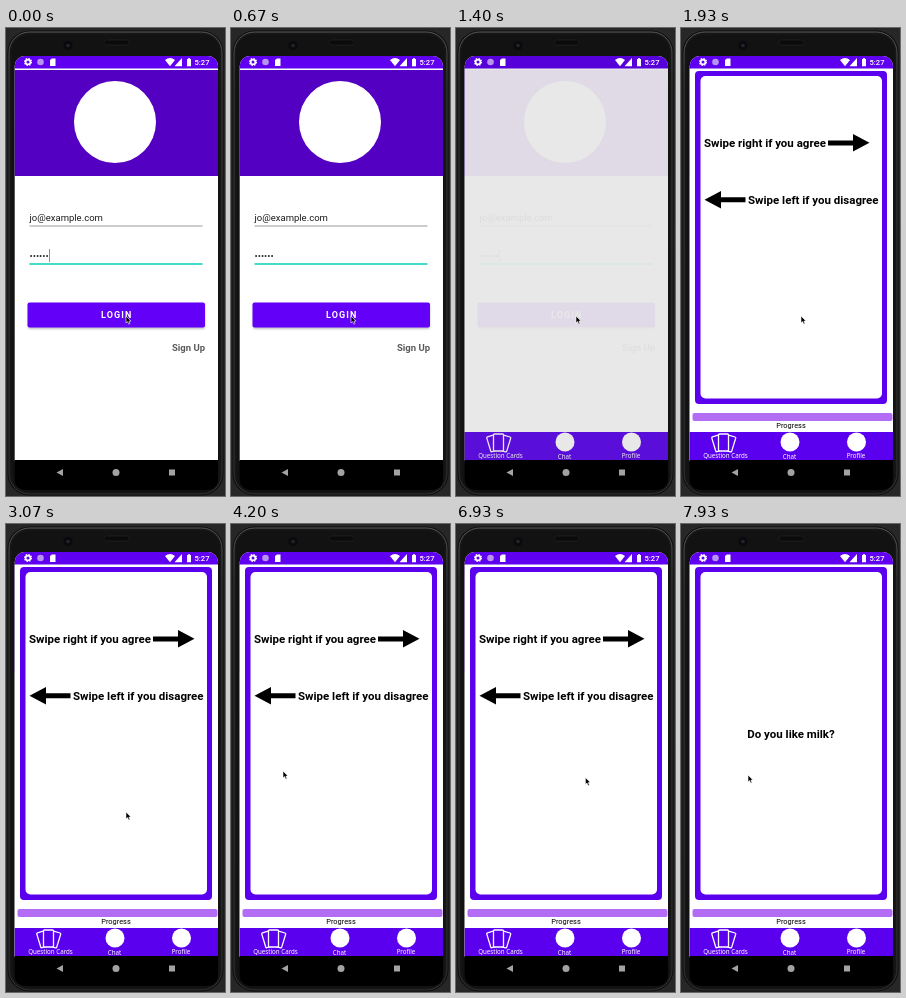
An HTML page for the animation above (8 s loop, 219 by 468 pixels).

```html
<!DOCTYPE html>
<html lang="en">
<head>
<meta charset="utf-8">
<title>Login and question cards</title>
<style>
  html, body { margin: 0; width: 100%; height: 100%; overflow: hidden; background: #272727; }
  svg { display: block; width: 100vw; height: 100vh; }
  text { font-family: Roboto, sans-serif; }
  .field { font-size: 9.5px; fill: #1c1c1c; }
  .card { font-size: 11.5px; font-weight: 700; }
  .tab { font: 6.2px "Noto Sans", sans-serif; fill: #fff; text-anchor: middle; }
</style>
</head>
<body>
<svg viewBox="0 0 219 468">
  <defs>
    <linearGradient id="rim" x2="0" y2="1">
      <stop offset="0" stop-color="#5c5c5c"/>
      <stop offset=".12" stop-color="#3c3c3c"/>
      <stop offset="1" stop-color="#343434"/>
    </linearGradient>
    <clipPath id="screenClip"><rect x="8.7" y="28" width="203.3" height="434" rx="10"/></clipPath>
    <clipPath id="buttonClip"><rect x="21.5" y="274.5" width="177.5" height="25" rx="2"/></clipPath>
    <filter id="blur" x="-10%" y="-50%" width="120%" height="200%"><feGaussianBlur stdDeviation="1.2"/></filter>
  </defs>

  <!-- phone body -->
  <rect x="1.5" y="2.5" width="216" height="465" rx="22" fill="#0c0c0c"/>
  <rect x="3" y="4" width="213" height="462" rx="20.5" fill="#161616" stroke="url(#rim)"/>
  <rect x="5.5" y="7" width="208" height="457" rx="17" fill="#121212"/>
  <circle cx="62" cy="17.5" r="4.5" fill="#0a0a0c"/>
  <circle cx="62" cy="17.5" r="1.8" fill="#24262e"/>
  <rect x="98" y="12" width="25" height="5" rx="2.5" fill="#0b0b0c" stroke="#262626" stroke-width=".6"/>

  <g clip-path="url(#screenClip)">
    <rect x="8" y="28" width="205" height="405" fill="#fff"/>

    <g id="login">
      <rect x="8" y="42" width="205" height="106" fill="#5400c2"/>
      <circle cx="109" cy="94" r="41" fill="#fff"/>
      <text class="field" x="23.5" y="193.3">jo@example.com</text>
      <path d="M23.5 198H196.5" stroke="#999"/>
      <text class="field" x="23.5" y="231">••••••</text>
      <path id="caret" d="M43.5 221V234" stroke="#03d0bd"/>
      <path d="M23.5 236H196.5" stroke="#03d0bd" stroke-width="1.3"/>
      <rect id="shadow" x="22" y="276" width="177" height="25" rx="2" filter="url(#blur)"/>
      <rect x="21.5" y="274.5" width="177.5" height="25" rx="2" fill="#6200f8"/>
      <circle id="ripple" cx="120" cy="289" fill="#fff" clip-path="url(#buttonClip)"/>
      <text x="95" y="290.3" font-size="9" font-weight="600" letter-spacing="1.1" fill="#fff">LOGIN</text>
      <text x="166" y="322.5" font-size="9.5" font-weight="700" fill="#5a5a5a">Sign Up</text>
    </g>

    <g id="home">
      <rect x="8" y="41" width="205" height="392" fill="#fff"/>
      <g id="content">
        <rect x="14" y="43" width="192" height="333" rx="4" fill="#5a00ee"/>
        <rect x="19.5" y="48" width="181.5" height="322.5" rx="5" fill="#fff"/>
        <g id="help" class="card">
          <text x="23" y="118.5">Swipe right if you agree</text>
          <path d="M147 112.5H172V106L188.5 114.8L172 123.5V117.5H147Z"/>
          <path d="M64.5 169.3H40V163L23.5 171.7L40 180.5V174.3H64.5Z"/>
          <text x="67" y="176">Swipe left if you disagree</text>
        </g>
        <text id="question" class="card" x="110" y="213.5" text-anchor="middle">Do you like milk?</text>
        <rect x="11.5" y="385" width="200" height="8" rx="2" fill="#b36df5"/>
        <text x="110" y="400" font-size="7.4" text-anchor="middle">Progress</text>
      </g>
      <rect x="8" y="404" width="205" height="29" fill="#5a00ee"/>
      <g fill="#5a00ee" stroke="#fff" stroke-width="1.3" stroke-linejoin="round">
        <rect x="32.5" y="407.5" width="9.5" height="15.5" rx="1" transform="rotate(-17 37 415)"/>
        <rect x="43.5" y="407.5" width="9.5" height="15.5" rx="1" transform="rotate(17 48 415)"/>
        <rect x="37.5" y="406" width="10" height="17" rx="1"/>
      </g>
      <circle cx="109" cy="414" r="9.5" fill="#fff"/>
      <circle cx="175.5" cy="414" r="9.5" fill="#fff"/>
      <text class="tab" x="44.5" y="430">Question Cards</text>
      <text class="tab" x="108.5" y="430.5">Chat</text>
      <text class="tab" x="175" y="430">Profile</text>
    </g>

    <rect x="8" y="28" width="205" height="12.5" fill="#5f00f0"/>
    <rect id="scrim" x="8" y="28" width="205" height="405"/>

    <!-- status icons -->
    <g fill="#fff">
      <circle cx="22" cy="34" r="2.4" fill="none" stroke="#fff" stroke-width="1.8"/>
      <circle cx="22" cy="34" r="3.5" fill="none" stroke="#fff" stroke-width="1.1" stroke-dasharray="1.4 1.35"/>
      <circle cx="34.5" cy="34" r="3.3" fill="#b795ef"/>
      <path d="M44 32L46 30.5H49.5V38H44Z"/>
      <path d="M159 32Q164 28.2 169 32L164 38.3Z"/>
      <path d="M176 30V38.3H168.5Z"/>
      <path d="M181 31H182.2V30H183.8V31H185V38.3H181Z"/>
      <text x="188.5" y="37" font-size="7.6" font-weight="500">5:27</text>
    </g>

    <!-- system navigation -->
    <rect x="8" y="432" width="205" height="31" fill="#000"/>
    <g fill="#a3a3a3">
      <path d="M50.5 444.5L57 441V448Z"/>
      <circle cx="110" cy="444.5" r="3.5"/>
      <rect x="163" y="441.5" width="6" height="6"/>
    </g>
  </g>

  <path id="pointer" d="M0 0V7L1.6 5.6L2.8 8.2L4 7.6L2.9 5.1H5Z" stroke="#fff" stroke-width=".6"/>
</svg>
<script>
const LOOP = 8000;
const el = id => document.getElementById(id);
const set = (id, attrs) => {
  for (const name in attrs) el(id).setAttribute(name, attrs[name]);
};
const show = (id, visible) => set(id, { visibility: visible ? "visible" : "hidden" });
const ramp = (t, from, to) => Math.min(1, Math.max(0, (t - from) / (to - from)));
const smooth = p => p * p * (3 - 2 * p);

// Pointer stops: time, x, y
const stops = [
  [0, 120, 288], [3800, 120, 288], [4190, 52, 247], [4800, 52, 247], [5330, 51, 247],
  [6530, 51, 247], [7250, 185, 258], [7450, 207, 264], [7900, 67, 251], [LOOP, 67, 251]
];

function pointerAt(t) {
  const i = stops.findIndex(stop => stop[0] > t);
  const [from, to] = [stops[i - 1], stops[i]];
  const p = smooth(ramp(t, from[0], to[0]));
  return [1, 2].map(axis => from[axis] + (to[axis] - from[axis]) * p);
}

function draw(t) {
  show("caret", t < 400 || t >= 900);

  // Button press: ripple and raised shadow
  const press = ramp(t, 700, 930);
  const release = 1 - ramp(t, 930, 1130);
  set("ripple", { r: 100 * smooth(press), opacity: t > 700 ? 0.2 * release : 0 });
  set("shadow", { opacity: 0.25 + 0.2 * press * release });

  // Screen change
  set("home", { opacity: ramp(t, 930, 1430) });
  set("scrim", { opacity: 0.09 * ramp(t, 930, 1130) * (1 - ramp(t, 1400, 1730)) });
  set("content", { opacity: ramp(t, 1450, 1780) });

  const answered = t >= 7200;
  show("help", !answered);
  show("question", answered);
  set("pointer", { transform: `translate(${pointerAt(t)})` });
}

const start = performance.now();
function tick() {
  draw((performance.now() - start) % LOOP);
  requestAnimationFrame(tick);
}
tick();
</script>
</body>
</html>
```
